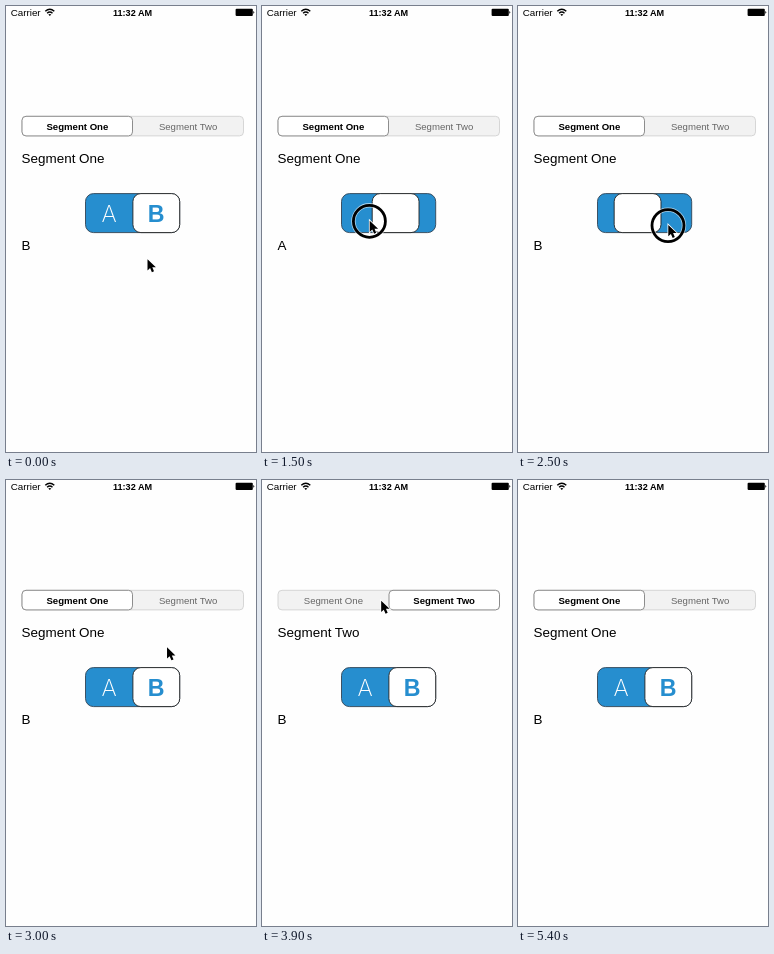
An HTML page for the animation above (6.3 s loop, 250x446 px).

```html
<!DOCTYPE html>
<html lang="en">
<head>
<meta charset="utf-8">
<title>Segmented controls</title>
<style>
  html, body { margin: 0; width: 100%; height: 100%; overflow: hidden; background: #fefefe; }
  svg { display: block; width: 100%; height: 100%; }
  text { font-family: "Liberation Sans", Arial, sans-serif; }
  .thin { font-family: Inter, Roboto, sans-serif; font-weight: 200; }
</style>
</head>
<body>
<svg viewBox="0 0 250 446" xmlns="http://www.w3.org/2000/svg">
  <rect width="250" height="446" fill="#fefefe"/>
  <text x="4.7" y="9.9" font-size="9.8">Carrier</text>
  <g fill="none" stroke="#000" stroke-width="1.5">
    <path d="M39.3 5.2Q43.8 1.3 48.3 5.2M41.1 7.2Q43.8 4.9 46.5 7.2"/>
    <path d="M43.8 10.1L42.3 8.5Q43.8 7.3 45.3 8.5Z" fill="#000" stroke="none"/>
  </g>
  <text x="126.5" y="9.8" font-size="9.1" font-weight="bold" text-anchor="middle">11:32 AM</text>
  <rect x="229.6" y="2.7" width="17.2" height="7.3" rx="1" fill="#000"/>
  <path d="M247.3 5Q249.4 6.4 247.3 7.8Z"/>
  <g id="scene"></g>
</svg>
<script>
const LOOP = 6300, STEP = 100, BLUE = '#268ecf';
const TAP_A = 1500, TAP_B = 2500, TAP_TWO = 3700;
const POINTER_HIDDEN = 4300, FADE_START = 4800, FADE_TIME = 600;
const scene = document.getElementById('scene');

const POINTER_HOME = { x: 140.5, y: 252.5 };
const POINTER_MOVES = [
  { start: 0, end: 500, x: 132.3, y: 252.5 },
  { start: 500, end: 700, x: 140.5, y: 247.5 },
  { start: 700, end: 1100, x: 106.7, y: 214 },
  { start: 2000, end: TAP_B, x: 149.3, y: 218.3 },
  { start: 2800, end: 3500, x: 171.2, y: 112.7 },
  { start: TAP_TWO, end: 4100, x: 100.5, y: 122.5 }
];

const clamp = v => Math.min(1, Math.max(0, v));
const mix = (a, b, k) => a + (b - a) * k;
const easeOut = p => 1 - (1 - p) ** 2;
const easeInOut = p => p * p * (3 - 2 * p);
const slide = (t, tap) => t < tap ? 0 : easeInOut(clamp((t - tap + 120) / 300));

function pointerAt(t) {
  return POINTER_MOVES.reduce((at, move) => {
    const k = easeOut(clamp((t - move.start) / (move.end - move.start)));
    return { x: mix(at.x, move.x, k), y: mix(at.y, move.y, k) };
  }, POINTER_HOME);
}

const box = (x, y, w, h, r, fill, stroke) =>
  `<rect x="${x}" y="${y}" width="${w}" height="${h}" rx="${r}" fill="${fill}" stroke="${stroke}" stroke-width=".9"/>`;
const text = (s, x, y, size, attrs = '') =>
  `<text x="${x}" y="${y}" font-size="${size}" ${attrs}>${s}</text>`;

const WIDE = {
  names: ['Segment One', 'Segment Two'], x: 16, y: 110.3, w: 221.5, h: 19.6, r: 4,
  thumb: 110.5, fill: '#f2f2f2', edge: '#d2d2d2', thumbEdge: '#808080',
  size: 9.6, baseline: 123.5, labelBaseline: 156.6,
  plain: 'fill="#666"', chosen: 'font-weight="bold"'
};
const SQUARE = {
  names: ['A', 'B'], x: 79.5, y: 187.6, w: 94.2, h: 39, r: 8,
  thumb: 46.8, fill: BLUE, edge: '#345', thumbEdge: '#222',
  size: 23.2, baseline: 216, labelBaseline: 243.6,
  plain: 'class="thin" fill="#fff"', chosen: `font-weight="bold" fill="${BLUE}"`
};

// pos runs from 0 (left) to 1 (right); the selected caption stays hidden until the thumb arrives.
function control(c, pos, selected) {
  const caption = (i, attrs) =>
    text(c.names[i], c.x + c.w * (i + 0.5) / 2, c.baseline, c.size, `text-anchor="middle" ${attrs}`);
  return box(c.x, c.y, c.w, c.h, c.r, c.fill, c.edge) +
    caption(1 - selected, c.plain) +
    box(c.x + (c.w - c.thumb) * pos, c.y, c.thumb, c.h, c.r, '#fff', c.thumbEdge) +
    (pos === selected ? caption(selected, c.chosen) : '') +
    text(c.names[selected], 15.6, c.labelBaseline, 13.45);
}

function ring({ x, y }) {
  const circle = (color, width) =>
    `<circle cx="${x + 0.7}" cy="${y + 1.3}" r="16" fill="none" stroke="${color}" stroke-width="${width}"/>`;
  return circle('rgba(255,255,255,.6)', 4.4) + circle('#000', 2.8);
}

const arrow = ({ x, y }) =>
  `<path transform="translate(${x + 1} ${y + 0.7})" d="M0 0V11.3L2.6 8.9L4.4 13L6.5 12.1L4.8 8.1H8.4Z"
    fill="#000" stroke="#fff" stroke-width="1.6" paint-order="stroke"/>`;

function render(t) {
  const onA = t >= TAP_A && t < TAP_B;
  let out = control(WIDE, slide(t, TAP_TWO), t < TAP_TWO ? 0 : 1) +
    control(SQUARE, 1 - slide(t, TAP_A) + slide(t, TAP_B), onA ? 0 : 1);

  const fade = clamp((t - FADE_START) / FADE_TIME);
  if (fade > 0) {
    out += `<g opacity="${fade}"><rect x="14" y="108" width="226" height="54" fill="#fefefe"/>` +
      control(WIDE, 0, 0) + '</g>';
  }
  if (t < POINTER_HIDDEN) {
    const at = pointerAt(t);
    const pressed = (tap, time) => t >= tap && t < tap + time;
    if (pressed(TAP_A, 200) || pressed(TAP_B, 200) || pressed(TAP_TWO, 100)) out += ring(at);
    out += arrow(at);
  }
  scene.innerHTML = out;
}

const start = performance.now();
let shown = -1;
function tick() {
  const elapsed = Math.max(0, performance.now() - start) % LOOP;
  const t = Math.floor(elapsed / STEP) * STEP;
  if (t !== shown) render(shown = t);
  requestAnimationFrame(tick);
}
tick();
</script>
</body>
</html>
```
